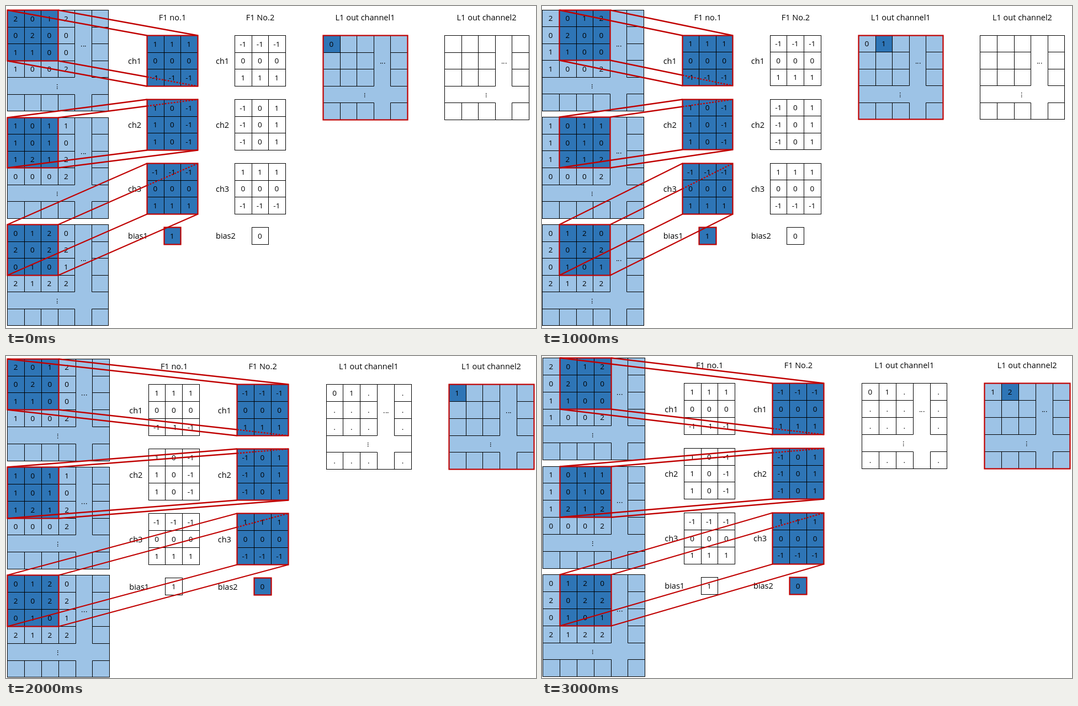
Write an HTML page with a canvas that moves like this. It is 960x584 px and loops after 4 s.

```html
<!DOCTYPE html>
<html lang="en">
<head>
<meta charset="utf-8">
<title>Convolution with two filters</title>
<style>
html, body { margin: 0; width: 100%; height: 100%; overflow: hidden; background: #fff; }
canvas { display: block; }
</style>
</head>
<body>
<canvas id="stage" width="960" height="584"></canvas>
<script>
const ctx = document.getElementById('stage').getContext('2d');
const LIGHT = '#9dc3e6', DARK = '#2e75b6', RED = '#c00000';
const CELL = 30.55;
const FONT = '"Open Sans", "Noto Sans", sans-serif';

const rows = text => text.split('/').map(r => r.split(' '));
const inputs = [
  '2 0 1 2/0 2 0 0/1 1 0 0/1 0 0 2',
  '1 0 1 1/1 0 1 0/1 2 1 2/0 0 0 2',
  '0 1 2 0/2 0 2 2/0 1 0 1/2 1 2 2'
].map(rows);
const down = '1 1 1/0 0 0/-1 -1 -1', up = '-1 -1 -1/0 0 0/1 1 1';
const filters = [
  { x: 255, title: 'F1 no.1', kernels: [down, '1 0 -1/1 0 -1/1 0 -1', up].map(rows), bias: '1' },
  { x: 414, title: 'F1 No.2', kernels: [up, '-1 0 1/-1 0 1/-1 0 1', down].map(rows), bias: '0' }
];
const done = rows('0 1 .  ./. . .  ./. . .  .//. . .  .');

// Each step: active filter, window column, output values, slight zoom and shift of the view
const steps = [
  { active: 0, col: 0, outs: [[['0']], []], s: 1, dx: 0, dy: 0 },
  { active: 0, col: 1, outs: [[['0', '1']], []], s: 1.0012, dx: -1.6, dy: -0.5 },
  { active: 1, col: 0, outs: [done, [['1']]], s: 1.0095, dx: 0.2, dy: -2.4 },
  { active: 1, col: 1, outs: [done, [['1', '2']]], s: 1.0105, dx: -1, dy: -4.1 }
];

let view;
const X = x => Math.round(x * view.s + view.dx) + 0.5;
const Y = y => Math.round(y * view.s + view.dy) + 0.5;

function line(x1, y1, x2, y2, color = '#000', width = 1, dash = []) {
  ctx.strokeStyle = color;
  ctx.lineWidth = width;
  ctx.setLineDash(dash);
  ctx.beginPath();
  ctx.moveTo(X(x1), Y(y1));
  ctx.lineTo(X(x2), Y(y2));
  ctx.stroke();
}

function fill(x, y, w, h, color) {
  ctx.fillStyle = color;
  ctx.fillRect(X(x), Y(y), X(x + w) - X(x), Y(y + h) - Y(y));
}

function frame(x, y, w, h, color = '#000', width = 1) {
  ctx.strokeStyle = color;
  ctx.lineWidth = width;
  ctx.setLineDash([]);
  ctx.strokeRect(X(x), Y(y), X(x + w) - X(x), Y(y + h) - Y(y));
}

function label(text, x, y, align = 'center', size = 14.5) {
  ctx.font = `${size}px ${FONT}`;
  ctx.textAlign = align;
  ctx.fillStyle = '#000';
  ctx.fillText(text, x * view.s + view.dx, y * view.s + view.dy + 5);
}

function values(x, y, table) {
  table.forEach((row, r) => row.forEach((v, c) =>
    label(v, x + (c + 0.5) * CELL, y + (r + 0.5) * CELL + 0.4, 'center', 13.5)));
}

function dots(x, y, stepX, stepY) {
  ctx.fillStyle = '#000';
  for (let i = -1; i < 2; i++)
    ctx.fillRect(X(x + i * stepX) - 0.5, Y(y + i * stepY) - 0.5, 1.4, 1.4);
}

// Square table of n cells a side; row and column number `gap` stay open
function grid(x, y, n, gap = n) {
  const size = n * CELL;
  for (let i = 1; i < n; i++) {
    const p = i * CELL;
    for (const [a, b] of [[0, gap], [gap + 1, n]]) {
      if (a >= b) continue;
      line(x + p, y + a * CELL, x + p, y + b * CELL);
      line(x + a * CELL, y + p, x + b * CELL, y + p);
    }
  }
  frame(x, y, size, size);
}

function drawInput(y, table) {
  const size = 6 * CELL;
  fill(2, y, size, size, LIGHT);
  fill(2 + view.col * CELL, y, 3 * CELL, 3 * CELL, DARK);
  grid(2, y, 6, 4);
  values(2, y, table);
  dots(139.5, y + 65, 3.5, 0);
  dots(91.5, y + 138.5, 0, 3.3);
}

function drawFilter(f, i) {
  const on = i === view.active;
  const tx = f.x - 34, size = 3 * CELL;
  label(f.title, f.x + 46.5, 21);
  f.kernels.forEach((kernel, k) => {
    const y = 53 + 116 * k;
    if (on) fill(f.x, y, size, size, DARK);
    grid(f.x, y, 3);
    values(f.x, y, kernel);
    label('ch' + (k + 1), tx, y + 47, 'left');
    if (on) frame(f.x, y, size, size, RED, 2.2);
  });
  const bx = f.x + CELL;
  if (on) fill(bx, 401, CELL, CELL, DARK);
  frame(bx, 401, CELL, CELL, on ? RED : '#000', on ? 2.2 : 1);
  values(bx, 401, [[f.bias]]);
  label('bias' + (i + 1), tx, 417, 'left');
}

function drawOutput(x, i) {
  const on = i === view.active, size = 5 * CELL;
  label('L1 out channel' + (i + 1), x + 76.5, 21);
  if (on) {
    fill(x, 53, size, size, LIGHT);
    fill(x + view.col * CELL, 53, CELL, CELL, DARK);
  }
  grid(x, 53, 5, 3);
  values(x, 53, view.outs[i]);
  dots(x + 107, 103, 3.5, 0);
  dots(x + 74.5, 161, 0, 3.3);
  if (on) frame(x, 53, size, size, RED, 2.2);
}

// Red beams from the window's corners to the kernel's corners
function drawBeams(k) {
  const size = 3 * CELL, wx = 2 + view.col * CELL, wy = 7 + 194.5 * k;
  const fx = filters[view.active].x, fy = 53 + 116 * k;
  frame(wx, wy, size, size, RED, 2.2);
  for (const a of [0, size]) for (const b of [0, size]) {
    const x1 = wx + a, y1 = wy + b, x2 = fx + a, y2 = fy + b;
    const hidden = a > 0 && (k === 0 ? b > 0 : b === 0);
    if (hidden) {
      const my = y1 + (y2 - y1) * (fx - x1) / (x2 - x1);
      line(x1, y1, fx, my, RED, 2.3);
      line(fx, my, x2, y2, RED, 2.2, [3, 2.4]);
    } else {
      line(x1, y1, x2, y2, RED, 2.3);
    }
  }
}

function draw(now) {
  view = steps[Math.floor(now / 1000) % 4];
  ctx.fillStyle = '#fff';
  ctx.fillRect(0, 0, 960, 584);
  inputs.forEach((table, k) => drawInput(7 + 194.5 * k, table));
  filters.forEach(drawFilter);
  [574, 794].forEach(drawOutput);
  inputs.forEach((_, k) => drawBeams(k));
}

const start = performance.now();
function tick() {
  draw(performance.now() - start);
  requestAnimationFrame(tick);
}
tick();
</script>
</body>
</html>
```
